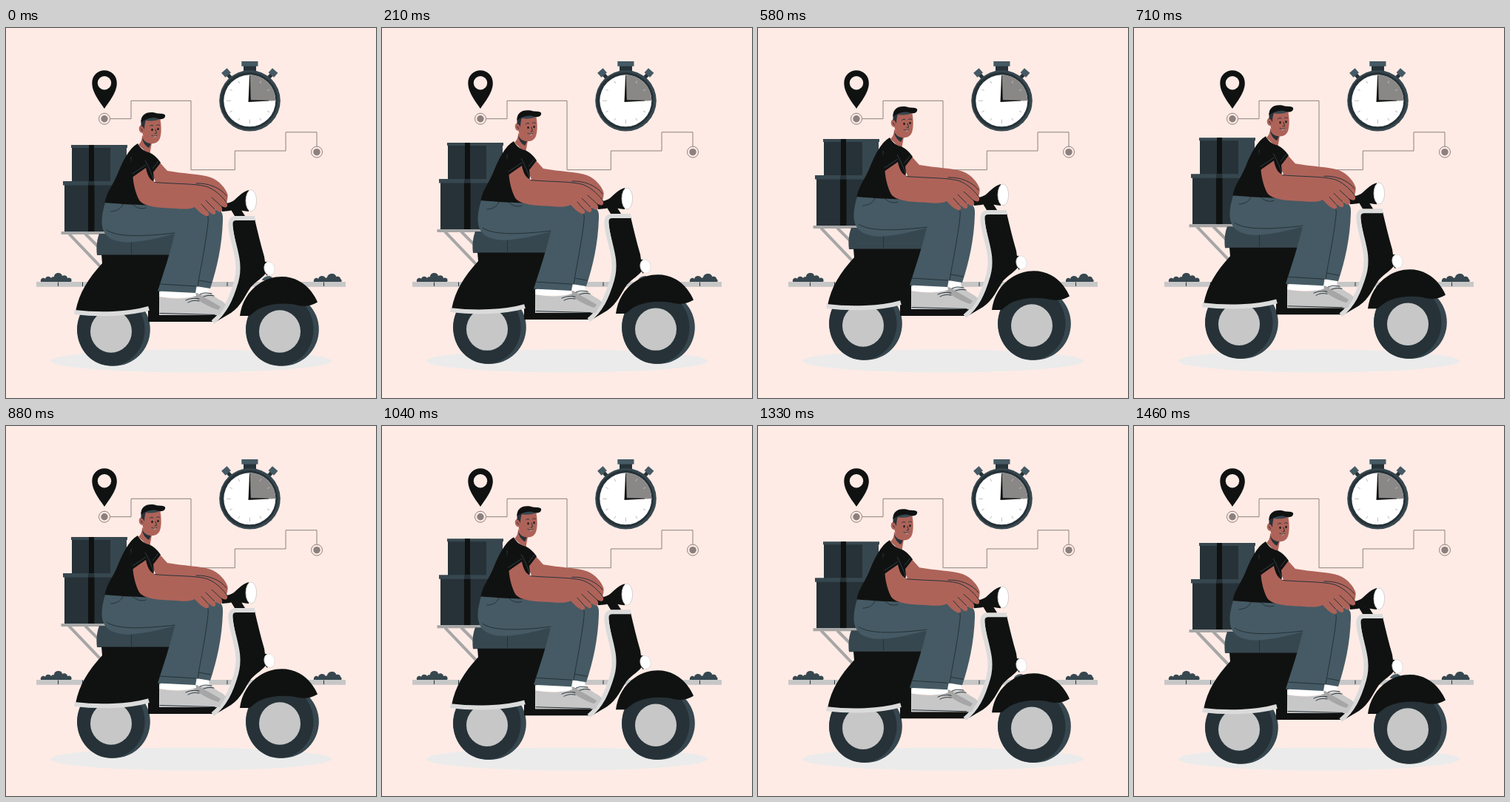
An HTML page that plays this animation: 500 px wide and 500 px high, repeating every 1.5 s.

```html
<!DOCTYPE html>
<html lang="en">
<head>
<meta charset="utf-8">
<title>Scooter delivery</title>
<style>
html, body { margin: 0; width: 100%; height: 100%; overflow: hidden; background: #ffebe5; }
svg { display: block; width: 100vw; height: 100vh; }
.navy { fill: #263238; }
.mid { fill: #37474f; }
.slate { fill: #455a64; }
.black { fill: #101211; }
.skin { fill: #ae6359; }
.grey { fill: #c7c7c7; }
.pale { fill: #dbdbdb; }
.line { fill: none; stroke: #263238; stroke-width: 1; stroke-linecap: round; stroke-linejoin: round; }
.seam { fill: none; stroke: #37474f; stroke-width: .8; }
</style>
</head>
<body>
<svg viewBox="0 0 500 500">
  <rect width="500" height="500" fill="#ffebe5"/>
  <ellipse cx="250" cy="450" rx="190" ry="15.5" fill="#ebebeb"/>

  <!-- kerb and bushes -->
  <g class="mid">
    <path d="M47 343C46 339 50 336 53 339C54 335 59 335 61 338C63 335 64 337 65 336C65 330 75 329 76 335C79 333 83 335 83 338C87 336 90 340 88 343Z"/>
    <path d="M416 343C415 339 419 336 422 339C423 334 430 334 432 338L434 337C435 330 446 331 446 336C450 335 452 337 452 339C454 340 454 342 453 343Z"/>
  </g>
  <rect x="41" y="343" width="418" height="6.800" class="grey"/>
  <path d="M70.500 343.500V349M103.500 343.500V349M299 343.500V349M429.500 343.500V349" stroke="#263238"/>

  <!-- route -->
  <g fill="none" stroke="#8c807e">
    <path d="M141 122.700H169V98.300H250V191.700H309.300V166H378V140.800H420V160"/>
    <circle cx="133" cy="122.700" r="7.500"/>
    <circle cx="420" cy="167.600" r="7.500"/>
  </g>
  <g fill="#8c807e">
    <circle cx="133" cy="122.700" r="4.700"/>
    <circle cx="420" cy="167.600" r="4.700"/>
  </g>
  <path class="black" d="M133 109C128 101 116.300 88 116.300 74.500C116.300 64 124 57.300 133 57.300S149.800 64 149.800 74.500C149.800 88 138 101 133 109Z"/>
  <circle cx="133" cy="74.300" r="9.200" fill="#ffebe5"/>

  <!-- stopwatch -->
  <path class="navy" d="M321 50H338V59H321Z"/>
  <path class="slate" d="M318.300 45H340.500V51.700H318.300Z"/>
  <g transform="translate(297.500 60.500) rotate(-42)">
    <path class="navy" d="M-2.500 3H2.500V13H-2.500Z"/><path class="slate" d="M-5 -4H5V4H-5Z"/>
  </g>
  <g transform="translate(361 60.500) rotate(42)">
    <path class="navy" d="M-2.500 3H2.500V13H-2.500Z"/><path class="slate" d="M-5 -4H5V4H-5Z"/>
  </g>
  <circle cx="329.500" cy="98.300" r="41.300" class="mid"/>
  <circle cx="328.500" cy="98.300" r="38.500" class="navy"/>
  <circle cx="329.300" cy="98.300" r="35" fill="#fff"/>
  <path d="M329.300 98.300V63.300A35 35 0 0 1 364.300 98.300Z" fill="#8a8887"/>
  <g id="ticks" stroke="#b8b8b8" stroke-width=".9"></g>
  <path class="black" d="M327.500 100L329.100 64H329.800L330.800 97.200L355 97.700V98.600Z"/>

  <!-- resting fork -->
  <path class="slate" d="M346 341C347 337 351 335.500 356 335L360 337L356 341Z"/>

  <g id="ride">
    <!-- parcels and rack -->
    <path d="M85 278L127 322M107 278L132 303" stroke="#a6a6a6" stroke-width="4"/>
    <path class="navy" d="M79 211H160V275H79ZM89 161H163V208H89Z"/>
    <path class="mid" d="M141 161H163V208H141ZM77 207H150V212.500H77ZM88 158H164V162H88Z"/>
    <path class="black" d="M112 158H119V207H112ZM111 212H119.500V275H111Z"/>
    <path class="navy" d="M111 207H119.500V212.500H111Z"/>
    <path d="M74.500 275H140V279H74.500Z" fill="#a6a6a6"/>

    <!-- wheels -->
    <g id="wheel">
      <circle cx="145.500" cy="407.500" r="49.300" class="mid"/>
      <ellipse cx="141.800" cy="407.500" rx="45.700" ry="49.100" class="navy"/>
      <ellipse cx="142" cy="410" rx="28" ry="28.700" class="grey"/>
    </g>
    <use href="#wheel" x="228"/>

    <!-- scooter body -->
    <path class="mid" d="M126 278H232L226 307H123C121.500 296 123 286 126 278Z"/>
    <path class="line" d="M169.500 288V305" stroke-width=".7"/>
    <path class="black" d="M129 306.500H226L214 356H207V388H297L280 397H192V382C160 387 125 385 94 383C99 357 111 339 130 318Z"/>
    <path d="M92.500 384C126 388 165 387 193 379" fill="none" stroke="#dbdbdb" stroke-width="6"/>
    <path class="black" d="M316 389C318 372 327 355 343 345C359 334.500 380 333 396 342C409 349 417 361 421 370.500C413 375 405 377 395 375C380 371 360 372 345 378C338 381 333 386 329 389Z"/>
    <path class="black" d="M306 259L336 258C340 275 344 292 349 309L352 330C348 337 338 342 331 350C323 361 318 376 304 385L282 398C302 372 313 350 314 325C315 300 306 280 306 259Z"/>
    <path d="M336 257H311C302 257 302.500 265 304.500 276C309 300 318 318 311 343C304 367 296 384 279.500 397.500" fill="none" stroke="#dbdbdb" stroke-width="6"/>
    <path class="black" d="M349 317C351 314 356 316 357 326L353 335C349 331 347 323 349 317Z"/>
    <ellipse cx="356" cy="325" rx="7" ry="9.300" transform="rotate(-12 356 325)" fill="#fff" stroke="#dbdbdb" stroke-width=".8"/>
    <path class="black" d="M303 244L318 246L323 254H309Z"/>
    <path class="black" d="M290 240C300 236 304 236 308 233C315 227 320 221 328 219V248C319 247 310 244 302 247L292 248Z"/>
    <ellipse cx="331.300" cy="233.300" rx="7.300" ry="14.500" fill="#fff" stroke="#c7c7c7" stroke-width=".8"/>

    <!-- shoes -->
    <path fill="#fff" d="M258 349L274 351L275 361L256 359Z"/>
    <path class="grey" d="M255 358C262 361 270 360 277 358C283 366 295 369 297 374L291 384L265 376Z"/>
    <path class="grey" d="M207 363C225 367 248 366 257 361C268 370 287 375 291 383L289 388H207.500Z"/>
    <path fill="#a6a6a6" d="M252 360L258 358C270 366 282 371 290 377L287 381C273 377 259 368 252 362Z"/>
    <path fill="#fff" d="M209 355L256 357L257 362C243 366 222 365 208 363Z"/>
    <path class="line" d="M208 385.500L246 386.500L282 387.500M243 368C249 365 255 365 261 366M246 371C251 368 256 368 261 369M262 360C268 357 273 358 278 359M267 363C272 361 277 361 281 362"/>

    <!-- trousers -->
    <path class="slate" d="M240 238L286 246C292 247 293.500 252 293 260C292 294 285 325 276 352L257 349L262 262Z"/>
    <path class="slate" d="M134 236C129 252 127 268 134 278C141 288 158 291 175 289C195 287 212 282 228 278C222 304 213 330 205 355.500L256 358C261 328 269 292 273 262C274 253 270 248 260 244L200 238Z"/>
    <path class="line" d="M136 273C150 283 185 282 228 277M265 246C272 249 274 254 273 263C270 292 263 324 259 349M208 346L257 349M261 341L277 344M158 238C155 245 150 247 142 248M171 238C177 244 183 245 189 243"/>

    <!-- torso and far arm -->
    <path class="skin" d="M197 195L207 181C212 186 215 190 218 193C240 197 262 197 277 202C289 207 297 217 299.500 225C300 232 298 237 295 239L268 217L201 211Z"/>
    <path class="skin" d="M184 145C184 151 182 155 179 158L194 172L197 155Z"/>
    <path class="navy" d="M184 148C187 154 191 156 196 156L193 162C188 159 185 155 184 148Z"/>
    <path class="black" d="M178 156C181 162 187 167 193 168C199 170 205 176 209 182L199 195C201 211 201 224 203 240C180 239 155 238 133.500 236C136 222 144 213 150 199C158 179 166 163 178 156Z"/>
    <path class="seam" d="M169 174L170 197M188 179C193 188 197 197 200 207M198 190L206 180"/>
    <path fill="#fff" d="M200 203L202 208L199.500 209Z"/>

    <!-- near arm and hand -->
    <path class="skin" d="M171.500 201L189 189C191 199 195 207 202 208C232 211 258 210 273 215C285 220 296 231 299 238C300 243 296 244 290 240C294 245 292 250 287 248L281 244C286 250 282 254 278 251L270 245C277 252 274 255 270 254C263 251 259 246 255 242C249 245 240 245 230 244C212 243 190 243 181 234C176 227 172 211 171.500 201Z"/>
    <path class="line" d="M201 208.500C230 211 259 210 273 215C285 220 294 230 299 237M257 210C273 209 290 216 298 227M278 229L291 241M270 233L282 245M264 238L272 247"/>
    <path class="black" d="M170 176C176 175 188 178 190 187L171 201.500C168 193 168 184 170 176Z"/>
    <path class="seam" d="M171 197L189 185"/>

    <!-- head -->
    <path class="skin" d="M184 124L208 121C210 131 210.500 142 208 149C205 157 195 158 190 153.500C187 150 185 146 184.500 142C179 142 178 132 183 131.500Z"/>
    <path class="navy" d="M182.500 125L190 121C188 127 187 131 187 137C185 133 184 132 182.500 133Z"/>
    <path class="mid" d="M189 123C196 119 204 120 208.500 122C204 126 196 126 189 125Z"/>
    <path class="black" d="M182.500 127.500C182 117 190 112.500 201 114.500C206 116.500 211 114.500 215 117.500C216 121.500 212 124 207 123C199 119.500 190 122 182.500 127.500Z"/>
    <g class="black">
      <ellipse cx="197.500" cy="137.500" rx="1.100" ry="1.700"/>
      <ellipse cx="205.500" cy="136.500" rx="1.100" ry="1.700"/>
    </g>
    <path class="line" d="M194.500 132.500C196 131 198 131 199 132M203.500 131.500C205 130.500 206 130.500 207.500 131.500M202 137L203.500 142L201 143M182.500 136L184.500 139"/>
    <path fill="#fff" d="M198 145.700C200 146.600 202 146.500 203.500 145.300C203 147.700 200 148.200 198 145.700Z"/>
    <path class="line" stroke-width=".7" d="M197 145.300C199.500 146.800 202 146.600 204 145"/>
  </g>
</svg>
<script>
const LOOP = 1500, MOVE = 1460, LIFT = 10;
const ride = document.getElementById("ride");

document.getElementById("ticks").innerHTML = Array.from({ length: 12 }, (_, i) =>
  `<path d="M329.3 67.3V${i % 3 ? 71 : 73}" transform="rotate(${i * 30} 329.3 98.3)"/>`).join("");

// steady rise, steady fall, short rest
function lift(ms) {
  const t = Math.min(ms / MOVE, 1);
  return LIFT * (1 - Math.abs(1 - 2 * t));
}

function draw(now) {
  ride.setAttribute("transform", `translate(0 ${-lift(now % LOOP).toFixed(3)})`);
  requestAnimationFrame(draw);
}

draw(performance.now());
</script>
</body>
</html>
```
